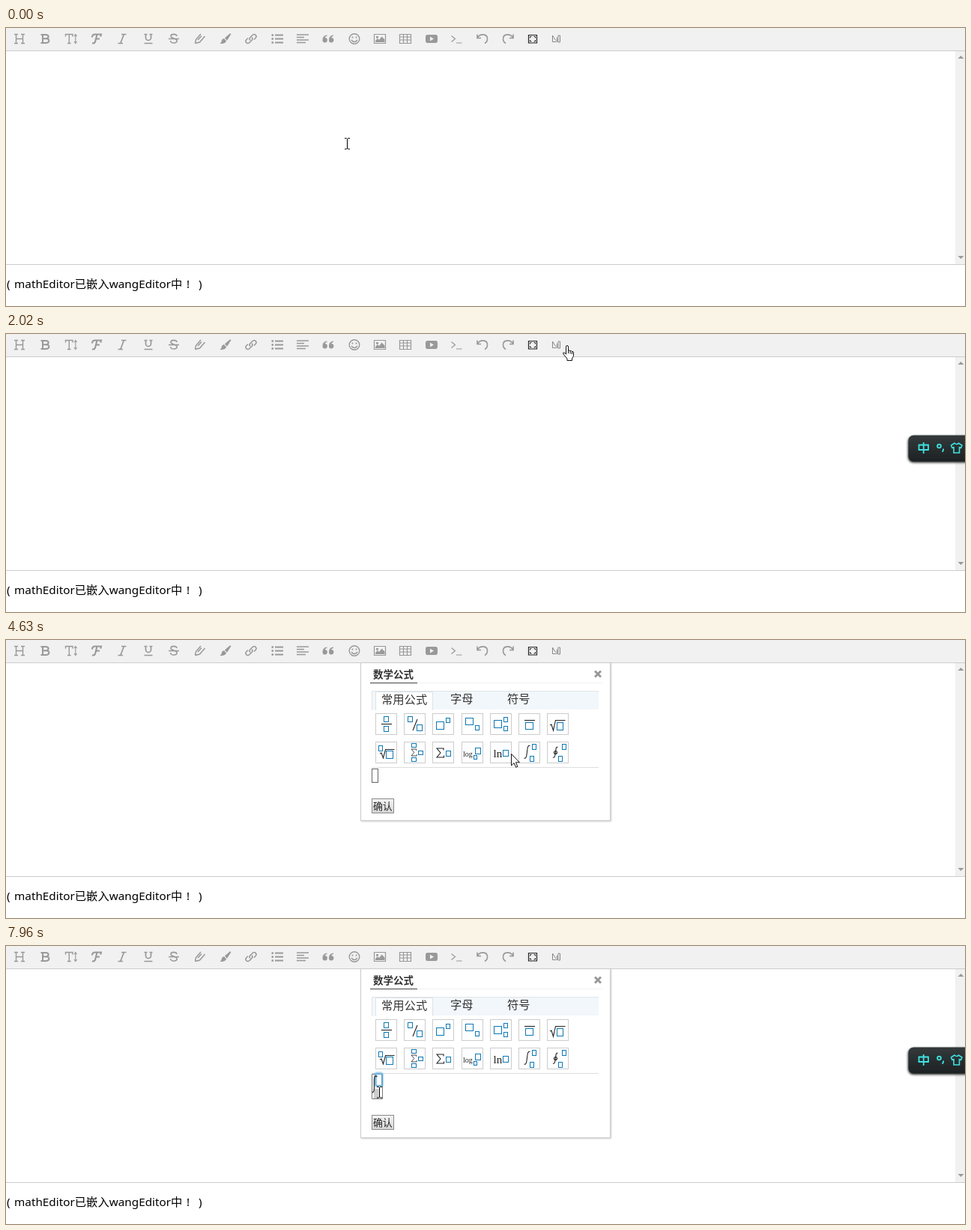
Recreate the animation shown at these times as an HTML page. Size 1280 by 372 pixels, loop 8 s.

```html
<!DOCTYPE html>
<html lang="zh-CN">
<head>
<meta charset="utf-8">
<style>
html, body { margin: 0; width: 100%; height: 100%; overflow: hidden; background: #fff; }
svg { display: block; width: 1280px; height: 372px; fill: none; }
text { font-family: 'Noto Sans', 'Noto Sans CJK SC', 'Noto Sans CJK', 'Noto Sans CJK JP', sans-serif; fill: #333; }
.serif { font-family: 'Liberation Serif', serif; fill: #222; }
.icon { stroke: #999; stroke-width: 1.4; }
.icon .solid { fill: #999; stroke: none; }
.slot { stroke: #0c78b4; stroke-width: 1; }
.ink { stroke: #222; stroke-width: 1.1; }
</style>
</head>
<body>
<svg viewBox="0 0 1280 372">
  <defs>
    <linearGradient id="face" x2="0" y2="1"><stop stop-color="#f4f4f4"/><stop offset="1" stop-color="#d6d6d6"/></linearGradient>
    <linearGradient id="dark" x2="0" y2="1"><stop stop-color="#343a3b"/><stop offset="1" stop-color="#1d2223"/></linearGradient>
    <linearGradient id="beam"><stop stop-color="#36e2dc" stop-opacity="0"/><stop offset=".5" stop-color="#36e2dc"/><stop offset="1" stop-color="#36e2dc" stop-opacity="0"/></linearGradient>
    <filter id="soft" x="-20%" y="-30%" width="140%" height="180%"><feDropShadow dx="-.5" dy="1.5" stdDeviation="1.8" flood-opacity=".9"/></filter>
    <filter id="panelShadow" x="-5%" y="-5%" width="110%" height="110%"><feDropShadow dx="1" dy="1" stdDeviation="1" flood-opacity=".2"/></filter>
    <filter id="blur" x="-100%" y="-50%" width="300%" height="200%"><feGaussianBlur stdDeviation="1.3"/></filter>
  </defs>

  <path d="M0 0H1280V30H0zM1267 31H1280V316H1267z" fill="#f1f1f1"/>
  <path d="M0 30.5H1280M0 316.5H1280" stroke="#ccc"/>
  <path d="M1270.5 41l4-4 4 4zM1270.5 305l4 4 4-4z" fill="#9a9a9a"/>
  <g id="toolbar"></g>
  <text y="348" font-size="15.3" style="fill:#000"><tspan x="1">(</tspan><tspan x="11">mathEditor已嵌入wangEditor中</tspan><tspan x="241">!</tspan><tspan x="257">)</tspan></text>
  <path id="editorCaret" d="M6.5 41v21" stroke="#000"/>

  <g id="dialog">
    <rect id="panel" x="473.5" y="30.5" width="333" height="211" fill="#fff" stroke="#ccc" filter="url(#panelShadow)"/>
    <path d="M473 30.5H807" stroke="#ccc"/>
    <path d="M549 57.5H796" stroke="#f1f1f1"/>
    <path d="M486 57.5H549" stroke="#444"/>
    <text x="490" y="50.5" font-size="13.5" font-weight="700">数学公式</text>
    <path d="M786 41.5l8 8M794 41.5l-8 8" stroke="#999" stroke-width="3"/>
    <path d="M488 68H791V93H488z" fill="#f2f7fb"/>
    <path d="M488.5 94V68.5H791" stroke="#dfe4e8"/>
    <path d="M493.5 94V69.5H569.5V94" fill="#fff" stroke="#dde2e6"/>
    <g font-size="15.3"><text x="501" y="85">常用公式</text><text x="593" y="84">字母</text><text x="669" y="84">符号</text></g>
    <path d="M488 170.5H791" stroke="#ddd"/>
    <g id="formulas"></g>
    <g id="confirm">
      <rect x="488.5" y="212.5" width="29" height="19" fill="url(#face)" stroke="#8a8a8a"/>
      <text x="490" y="227" font-size="12.8" style="fill:#222">确认</text>
    </g>
    <rect id="emptyInput" x="488.5" y="172.5" width="8" height="18" stroke="#666"/>
    <g id="integral">
      <path id="outerGlow" d="M487 170H504.5V205" stroke="#4d9fd0" stroke-width="4" filter="url(#blur)"/>
      <path d="M488.5 171.5H502.5V204.5H488.5z" fill="#fff" stroke="#777"/>
      <path id="innerTint" d="M489 172H502V204H489z" fill="#dceaf2"/>
      <path d="M491 191h6.500v13H491z" fill="#ccc"/>
      <path id="emptyUpper" d="M494 172h7v14h-7z" fill="#ddd"/>
      <rect id="upperGlow" x="493.5" y="171" width="8" height="15.5" rx="1" fill="#fff" stroke="#68b4df" stroke-width="3.5" filter="url(#blur)"/>
      <path id="upperBox" d="M494 171.5h7.500v15H494z" fill="#fff" stroke="#5aa9d8"/>
      <path d="M495.5 175c-3-2.500-4 0-4 4v11c0 4-.5 6-3 6" stroke="#333" stroke-width="1.3"/>
      <path id="formulaCaret" d="M494.5 172v13" stroke="#000"/>
    </g>
  </g>

  <g id="tooltip">
    <rect x="729.5" y="45.5" width="58" height="20" rx="1" fill="#fff" stroke="#767676"/>
    <text x="735" y="60" font-size="11.7" style="fill:#575757">数学公式</text>
  </g>

  <g id="ime">
    <rect x="1204.5" y="135.5" width="90" height="35" rx="7" fill="url(#dark)" filter="url(#soft)"/>
    <path d="M1222 168.5h46" stroke="url(#beam)" stroke-width="1.5"/>
    <g stroke="#3fe3e0" stroke-width="1.8">
      <path d="M1218.5 148.5h12.500v6.500h-12.500zM1224.700 145v15"/>
      <circle cx="1245.5" cy="150" r="2.4"/>
      <path d="M1251 153.5v2l-1.300 2.300"/>
      <path d="M1266 146l-4.500 3 1.500 3.500 2-.8v7.300h7.500v-7.300l2 .8 1.500-3.500-4.500-3q-2.500 3-5.500 0z" stroke-width="1.6"/>
    </g>
  </g>

  <g id="pointer">
    <path data-kind="beam" d="M-3.500-7h2.500l1 1 1-1h2.500M-3.500 7.500h2.500l1-1 1 1h2.500M0-6V6.500" stroke="#000"/>
    <g data-kind="hand" stroke="#111">
      <path d="M4.500 12V2a1.500 1.500 0 0 1 3 0V7.500q1.300-1.500 2.600.2q1.500-1 2.300.8q2-.7 2.100 1.500v4.500l-2 3.500v2.500H6V18L1 12q-1.200-2.200 1-2.200z" fill="#fff"/>
      <path d="M7.500 7v4M10.100 8v3.500M12.400 9v3"/>
    </g>
    <path data-kind="arrow" d="M.5.5v15.500l3.600-3.400 2.500 5.700 2.300-1-2.500-5.500h5z" fill="#fff" stroke="#111"/>
  </g>
</svg>

<script>
const $ = id => document.getElementById(id);
const line = (d, extra = '') => `<path d="${d}" ${extra}/>`;
const solid = d => line(d, 'class="solid"');

const icons = [
  [18, line('M-7-6h5M2-6h5M-7 6h5M2 6h5M-4.500-6v12M4.500-6v12M-4.500 0h9')],
  [52, line('M-5.500-5.500h6.500c5 0 4.500 5 .5 5.200c5.500 0 5 5.800-.5 5.800h-6.500M-3-5.500v11M-3-.2h4.500', 'stroke-width="2"')],
  [87, line('M-7.500-3v-3h9.500v3M-2.700-6v12M-5 6h4.600') + line('M5.800-5v10M4-3.500l1.800-2.500 1.800 2.500M4 3.500l1.800 2.500 1.800-2.500', 'stroke-width="1.1"')],
  [121, line('M-6-2q0-4 4-4h8l-.8 3M.5-6l-2.500 10q-1 2.500-4 1.800M-1 0h5', 'stroke-width="2.1"')],
  [155, line('M-1-6h6.500M-5.500 6h6.500M2.400-6l-4.600 12', 'stroke-width="1.7"')],
  [190, line('M-3.500-6v4.500a3.500 3.500 0 0 0 7 0v-4.500M-5.500-6h4M1.500-6h4M-5.500 6h11', 'stroke-width="1.7"')],
  [224, line('M4-3.500c-.5-3.500-8-3.500-8 0c0 3 8.200 3 8.200 6c0 4-8.200 4-8.700 0M-7 0h14', 'stroke-width="1.6"')],
  [259, line('M-6.500 6l1-5 6.500-7.500M-6.500 6l6-1.500 7-8M-3 1.500l5-5.500', 'stroke-width="1.5"')],
  [293, solid('M7.500-6.500l-1.500-.8-7 6 3 3.500zM-2-.5l3 3.300q-1 4.200-8.500 3.700q2.500-1.500 2.300-4q.5-2.500 3.200-3z')],
  [327, line('M-1 2q-2-2 0-4l3-3q2.500-2 4.300 0q1.700 2-.3 4l-2 2M1-2q2 2 0 4l-3 3q-2.500 2-4.300 0q-1.700-2 .3-4l2-2', 'stroke-width="1.5"')],
  [362, line('M-3-5h11M-3 0h11M-3 5h11', 'stroke-width="2"') + line('M-7.500-5h2.500M-7.500 0h2.500M-7.500 5h2.500', 'stroke-width="2.6"')],
  [396, line('M-8-5.500h16M-8-2h10M-8 1.500h16M-8 5h12', 'stroke-width="1.7"')],
  [430, solid('M-1.500-5q-6 .5-6 6.500a3.200 3.200 0 1 0 3.200-3q.2-2 2.800-2.300zM7-5q-6 .5-6 6.500a3.200 3.200 0 1 0 3.200-3q.2-2 2.800-2.300z')],
  [465, '<circle r="6.8"/>' + line('M-4 1.500q4 5 8 0M-2.500-3v2M2.500-3v2', 'stroke-width="1.7"')],
  [499, line('M-7.500-6h15v12h-15z', 'stroke-width="1.2"') + solid('M-6 4.500v-2l3-3 2 2 3.500-4.500 4 4v3.500zM-5-3.500h3v2.500h-3z')],
  [533, line('M-7.500-6h15v12h-15zM-7.500-2.500h15M-7.500 1.500h15M-2.500-6v12M2.500-6v12', 'stroke-width="1.2"')],
  [568, solid('M-5.500-5.500h11q2.500 0 2.500 3v5q0 3-2.500 3h-11q-2.500 0-2.500-3v-5q0-3 2.500-3zM-2-3v6l5-3z')],
  [601, line('M-6.500-4l5 4-5 4M0 5.500h7.500', 'stroke-width="1.2"')],
  [636, line('M-7-6v5h5M-6.500-1.500c3-6 13-5.500 13 1.500q0 4-3.500 6', 'stroke-width="1.6"')],
  [670, line('M7-6v5h-5M6.500-1.500c-3-6-13-5.500-13 1.500q0 4 3.500 6', 'id="redo" stroke-width="1.6"')],
  [703, line('M-5.500-5h11v10.500h-11z', 'stroke="#222" stroke-width="1.2"') + line('M-3.500-1v-2h2M1.500-3h2v2M3.500 1.500v2h-2M-1.500 3.500h-2v-2', 'stroke="#222" stroke-width="1"')],
  [734, line('M-4.500-4.500v8.500h5M-4.500-4.500l4.500 7M1.500-2v6.500M3-4.500h2.500v9h-2.500z', 'stroke="#888" stroke-width="1"')]
];
$('toolbar').innerHTML = icons.map(([x, art]) =>
  `<g class="icon" transform="translate(${x} 14.5)">${art}</g>`).join('');

const slot = (x, y, w, h) => `<rect class="slot" x="${x}.5" y="${y}.5" width="${w}" height="${h}"/>`;
const ink = d => line(d, 'class="ink"');
const word = (s, x, y, size) => `<text class="serif" x="${x}" y="${y}" font-size="${size}">${s}</text>`;
const sigma = (x, y, s) => `<path class="ink" transform="translate(${x} ${y}) scale(${s})" d="M9 2.500V0H0l5 6-5 6h9.500v-2.500"/>`;
const formulas = [
  slot(11, 4, 6, 7) + ink('M8 14.500h14') + slot(11, 17, 6, 7),
  slot(5, 4, 6, 7) + ink('M18 8l-6 15') + slot(17, 15, 7, 8),
  slot(5, 11, 10, 10) + slot(18, 6, 5, 6),
  slot(5, 6, 10, 9) + slot(18, 16, 5, 6),
  slot(5, 9, 10, 10) + slot(18, 5, 5, 6) + slot(18, 17, 5, 6),
  ink('M8 9.500h14') + slot(9, 12, 10, 9),
  ink('M4 16l2-1 2.500 8 3-13.500h13') + slot(13, 12, 8, 10),
  slot(4, 5, 5, 7) + ink('M6 16l2-1 2.500 7 3-11.500h12') + slot(14, 12, 9, 10),
  slot(10, 2, 6, 5) + sigma(10, 10, .75) + slot(10, 21, 6, 5) + slot(19, 12, 6, 5),
  sigma(6, 9, 1) + slot(18, 12, 6, 7),
  word('log', 2, 20, 10) + slot(18, 8, 7, 8) + slot(16, 18, 4, 5),
  word('ln', 4.5, 21, 15) + slot(17, 11, 7, 8),
  ink('M15.500 5.500c-3-1.500-3.500 3-4 8s-1 10-4 8.500') + slot(18, 3, 5, 7) + slot(15, 19, 5, 7),
  ink('M14.500 7.500c-2.500-1.500-2.500 2.500-3 6.500s-1 8.500-3.500 7') + '<circle class="ink" cx="11.5" cy="14.5" r="2"/>' + slot(20, 3, 5, 7) + slot(15, 19, 5, 7)
];
$('formulas').innerHTML = formulas.map((art, i) => {
  const x = Math.round(493 + i % 7 * 38.2), y = i < 7 ? 98 : 136;
  return `<g transform="translate(${x} ${y})"><rect x=".5" y=".5" width="28" height="28" stroke="#ccc"/>${art}</g>`;
}).join('');

// Pointer path: [tick, x, y, kind]
const path = [
  [0, 455, 154, 'beam'], [3, 412, 158, 'beam'], [5, 412, 158, 'beam'], [11, 570, 98, 'beam'],
  [14, 659, 24, 'hand'], [16, 667, 18, 'hand'], [20, 692, 16, 'hand'], [23, 692, 16, 'hand'],
  [26, 743, 15, 'hand'], [28, 725, 11, 'hand'], [30, 725, 11, 'hand'], [31, 690, 50, 'arrow'],
  [34, 498, 169, 'arrow'], [40, 597, 165, 'arrow'], [41, 597, 165, 'arrow'], [44, 667, 157, 'arrow'],
  [47, 628, 156, 'arrow'], [51, 628, 156, 'arrow'], [52, 627, 156, 'arrow'], [53, 627, 156, 'arrow'],
  [56, 661, 152, 'arrow'], [59, 661, 152, 'arrow'], [60, 674, 152, 'arrow'], [62, 695, 151, 'arrow'],
  [63, 695, 151, 'arrow'], [65, 694, 145, 'arrow'], [69, 500, 181, 'beam'], [71, 500, 181, 'beam'],
  [75, 500, 179, 'beam'], [76, 500, 179, 'beam'], [77, 499, 179, 'beam'], [80, 499, 179, 'beam'],
  [81, 497, 180, 'beam'], [84, 497, 180, 'beam'], [87, 498, 185, 'beam'], [91, 498, 185, 'beam'],
  [96, 499, 192, 'beam'], [101, 499, 192, 'beam'], [102, 498, 195, 'beam']
];

function pointerAt(tick) {
  let i = path.length - 1;
  while (path[i][0] > tick) i--;
  const a = path[i], b = path[i + 1] || a;
  const p = a === b ? 0 : (tick - a[0]) / (b[0] - a[0]);
  const mix = n => Math.round(a[n] + (b[n] - a[n]) * p);
  return { x: mix(1), y: mix(2), kind: a[3] };
}

const show = (id, on) => $(id).setAttribute('visibility', on ? 'inherit' : 'hidden');
const move = (el, x, y) => el.setAttribute('transform', `translate(${x} ${y})`);
const kinds = document.querySelectorAll('[data-kind]');

function draw(ms) {
  const tick = Math.floor((ms + 15) / 77.3);
  const within = (from, to) => tick >= from && tick < to;

  const { x, y, kind } = pointerAt(tick);
  const half = kind === 'beam' ? .5 : 0;
  move($('pointer'), x + half, y + half);
  kinds.forEach(k => k.setAttribute('visibility', k.dataset.kind === kind ? 'visible' : 'hidden'));
  $('redo').style.stroke = within(15, 18) ? '#333' : '';

  show('editorCaret', within(5, 12) || within(19, 26));
  show('ime', within(6, 30) || tick >= 74);
  $('dialog').setAttribute('visibility', tick >= 30 ? 'visible' : 'hidden');
  show('tooltip', within(32, 35));
  $('tooltip').setAttribute('opacity', tick === 34 ? .35 : 1);

  const inserted = tick >= 65, focused = within(81, 83), upper = tick >= 83;
  $('panel').setAttribute('height', inserted ? 226 : 211);
  move($('confirm'), 0, inserted ? 14 : 0);
  show('emptyInput', !inserted);
  show('integral', inserted);
  show('outerGlow', focused);
  show('innerTint', focused);
  show('emptyUpper', within(65, 81));
  show('upperGlow', upper);
  show('upperBox', upper);
  show('formulaCaret', within(83, 90) || within(96, 103));
}

function loop() {
  draw(performance.now() % 8000);
  requestAnimationFrame(loop);
}
loop();
</script>
</body>
</html>
```
